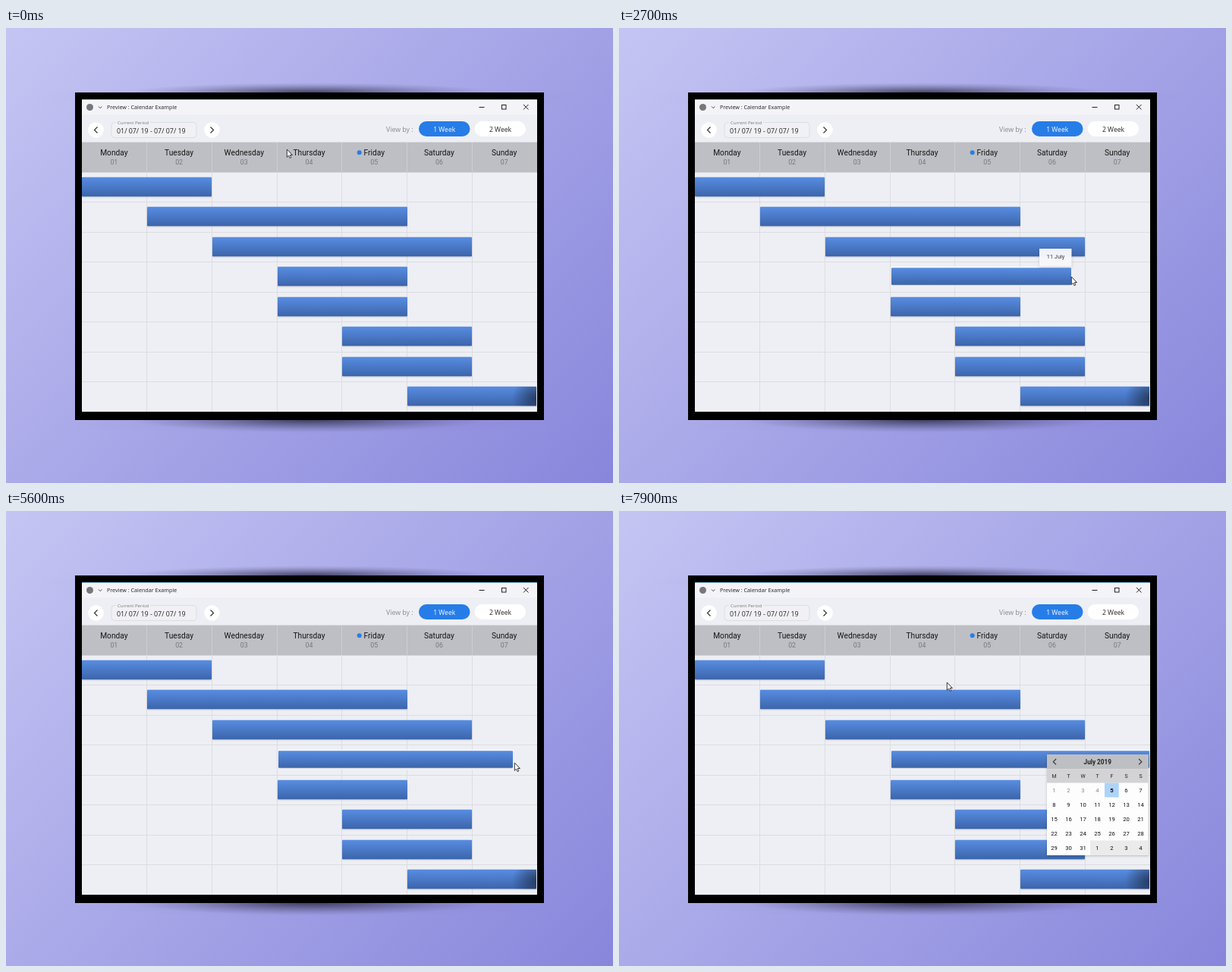
These frames come from a looping animation (800x600 px, 8000 ms). An HTML page with a canvas:

```html
<!DOCTYPE html>
<html lang="en">
<head>
<meta charset="utf-8">
<title>Calendar Example</title>
<style>
html, body { margin: 0; width: 100%; height: 100%; overflow: hidden; }
canvas { display: block; }
</style>
</head>
<body>
<canvas id="stage" width="800" height="600"></canvas>
<script>
const c = document.getElementById('stage').getContext('2d');
const LOOP = 8000, LEFT = 100, RIGHT = 699, COL = 600 / 7, ROW = 39.45;
const SANS = '"Open Sans", sans-serif', ROBOTO = 'Roboto, sans-serif';
const DAYS = ['Monday', 'Tuesday', 'Wednesday', 'Thursday', 'Friday', 'Saturday', 'Sunday'];

// first day, number of days
const TASKS = [[0, 2], [1, 4], [2, 4], [3, 2], [3, 2], [4, 2], [4, 2], [5, 2]];
const DRAGGED = 3, GRAB = 2200, DROP = 4000, DROP2 = 5600;

// time, x, y
const STOPS = [
  [0, 370, 160], [500, 432, 226], [1700, 520, 332], [GRAB, 530, 330], [2700, 596, 328],
  [3900, 611, 327], [4200, 608, 301], [4800, 615, 331], [DROP2, 670, 332], [6600, 670, 332],
  [7000, 689, 329], [7200, 690, 353], [7900, 662, 354]
];

const ramp = (t, a, b) => Math.min(1, Math.max(0, (t - a) / (b - a)));
const pulse = (t, a, b) => ramp(t, a, a + 200) * (1 - ramp(t, b, b + 320));
const edge = day => LEFT + COL * day;

function pointer(t) {
  const i = Math.max(1, STOPS.findIndex(s => s[0] > t));
  const [t1, x1, y1] = STOPS[i - 1], [t2, x2, y2] = STOPS[i], p = ramp(t, t1, t2);
  return [x1 + (x2 - x1) * p, y1 + (y2 - y1) * p];
}

// The dragged end follows the pointer, then snaps to a day edge.
function dragEnd(t) {
  const x = pointer(t)[0], snap = edge(6) - 1;
  if (t < GRAB) return edge(5);
  if (t < DROP) return Math.min(x, snap);
  if (t < DROP2) return Math.max(x - 2, snap);
  return 668 + (RIGHT - 668) * ramp(t, DROP2, 6000);
}

function rect(x, y, w, h, fill) {
  c.fillStyle = fill;
  c.fillRect(x, y, w, h);
}

function round(x, y, w, h, r, fill, stroke) {
  c.beginPath();
  c.roundRect(x, y, w, h, r);
  c.fillStyle = fill;
  c.fill();
  if (stroke) { c.strokeStyle = stroke; c.lineWidth = 1; c.stroke(); }
}

function dot(x, y, r, fill) {
  c.beginPath();
  c.arc(x, y, r, 0, 7);
  c.fillStyle = fill;
  c.fill();
}

function line(color, width, ...pts) {
  c.beginPath();
  for (let i = 0; i < pts.length; i += 2) c.lineTo(pts[i], pts[i + 1]);
  c.strokeStyle = color;
  c.lineWidth = width;
  c.stroke();
}

// dir -1 points left, 1 points right
const chevron = (x, y, s, dir) =>
  line('#333', 1.2, x - dir * s / 2, y - s, x + dir * s / 2, y, x - dir * s / 2, y + s);

function text(s, x, y, font, color, align = 'left') {
  c.font = font;
  c.fillStyle = color;
  c.textAlign = align;
  c.fillText(s, x, y);
}

function shadow(blur, color, y = 0) {
  c.shadowBlur = blur;
  c.shadowColor = color;
  c.shadowOffsetY = y;
}

function glow(x, y, rx, ry, alpha) {
  c.save();
  c.translate(x, y);
  c.scale(rx, ry);
  const g = c.createRadialGradient(0, 0, 0, 0, 0, 1);
  for (let i = 0; i <= 4; i++) g.addColorStop(i / 4, `rgba(35,35,60,${alpha * (1 - i / 4) ** 1.3})`);
  dot(0, 0, 1, g);
  c.restore();
}

function backdrop() {
  const g = c.createLinearGradient(30, -55, 770, 655);
  g.addColorStop(0, '#c6c6f4');
  g.addColorStop(1, '#8785db');
  rect(0, 0, 800, 600, g);
  glow(400, 92, 375, 18, .1);
  glow(400, 85, 235, 13, .75);
  glow(400, 520, 330, 16, .1);
  glow(400, 516, 235, 17, .8);
  rect(91, 85, 618, 432, '#000');
}

function chrome() {
  rect(100, 94, 600, 412, '#eeeff4');
  rect(100, 94, 600, 20, '#f4f4f8');
  rect(100, 94, 600, 1, '#8ccbe6');
  dot(110.5, 104.5, 4.5, '#77777b');
  line('#444', 1, 122, 103.5, 124.2, 105.7, 126.4, 103.5);
  text('Preview : Calendar Example', 133, 107.3, '7.2px ' + SANS, '#222');
  line('#222', 1, 623.5, 104.5, 630.5, 104.5);
  c.strokeRect(653.5, 101.5, 5.5, 5.5);
  line('#222', 1, 682, 101, 688.5, 107.5);
  line('#222', 1, 688.5, 101, 682, 107.5);

  [[118.5, -1], [271.5, 1]].forEach(([x, dir]) => {
    dot(x, 134.5, 10.3, '#fff');
    chevron(x, 134.5, 4, dir);
  });
  round(139, 124.5, 112, 20, 4, '#f1f1f5', '#dcdde1');
  rect(145, 123, 45, 3, '#f0f0f5');
  text('Current Period', 147, 127.3, '6px ' + SANS, '#777');
  text('01/ 07/ 19 - 07/ 07/ 19', 146, 138.5, '8.9px ' + SANS, '#222');

  text('View by :', 501, 136.7, '8.8px ' + SANS, '#888');
  round(544, 123, 67.5, 20, 10, '#267de8');
  round(617.5, 123, 67.5, 20, 10, '#fff');
  text('1 Week', 577.7, 136.5, '8.6px ' + SANS, '#fff', 'center');
  text('2 Week', 651.5, 136.5, '8.6px ' + SANS, '#222', 'center');
}

function grid() {
  for (let i = 1; i < 8; i++) rect(100, Math.round(190 + ROW * i), 600, 1, '#dcdde0');
  rect(100, 151, 600, 39, '#bebfc4');
  DAYS.forEach((day, i) => {
    const x = Math.floor(edge(i)), mid = edge(i + .5) - .5;
    if (i) {
      rect(x, 151, 1, 39, '#cdced2');
      rect(x, 190, 1, 316, '#dcdde0');
    }
    text(day, mid, 167.8, '10.2px ' + ROBOTO, '#151515', 'center');
    text('0' + (i + 1), mid, 180, '8.8px ' + ROBOTO, '#77787c', 'center');
  });
  rect(100, 150, 600, 1, '#dadbdf');
  rect(100, 190, 600, 1, '#d5d6d9');
  dot(465.7, 164.2, 3, '#2a7de6');
}

function bar(x1, x2, y, h) {
  const g = c.createLinearGradient(0, y, 0, y + h);
  g.addColorStop(0, '#588de2');
  g.addColorStop(1, '#3c65ab');
  shadow(2, 'rgba(0,0,0,.15)', 1);
  round(x1, y, x2 - x1, h, 1, g);
  shadow(0, 'transparent');
}

function bars(t) {
  TASKS.forEach(([day, days], i) => {
    const x1 = Math.ceil(edge(day)), x2 = Math.min(RIGHT, Math.round(edge(day + days)));
    const y = Math.round(197 + ROW * i) - .3;
    if (i == DRAGGED && t >= GRAB) {
      const end = dragEnd(t);
      round(x1, y, end + 1 - x1, 26.5, 1, '#f8f9fc');
      bar(x1 + 1, end, y + 1.5, 22.5);
    } else bar(x1, x2, y, 25.5);
  });
  const g = c.createRadialGradient(RIGHT, 488, 0, RIGHT, 488, 32);
  g.addColorStop(0, 'rgba(20,30,50,.65)');
  g.addColorStop(1, 'rgba(20,30,50,0)');
  rect(660, 473, 39, 25.5, g);
}

function tip(t) {
  const x = dragEnd(t);
  c.globalAlpha = Math.max(pulse(t, 2100, 3900), pulse(t, 4900, 5250));
  shadow(3, 'rgba(0,0,0,.15)', 1);
  rect(x - 42, 291, 42.5, 23.5, 'rgba(248,249,253,.96)');
  shadow(0, 'transparent');
  text('11 July', x - 20.5, 304.4, '7.3px ' + ROBOTO, '#333', 'center');
  c.globalAlpha = 1;
}

function icon(t) {
  c.globalAlpha = ramp(t, 6600, 6900) / 2;
  rect(681, 321, 16.5, 14, '#a0a6b4');
  c.globalAlpha = 1;
}

function menu(t) {
  if (t < 7200) return;
  rect(564, 321, 133.5, 134, 'rgba(60,60,60,.04)');
  c.globalAlpha = ramp(t, 7200, 7500);
  shadow(3, 'rgba(0,0,0,.2)', 1);
  rect(564, 321, 133.5, 133, '#fdfdfe');
  shadow(0, 'transparent');
  rect(564, 321, 133.5, 19.5, '#bebfc3');
  rect(564, 340.5, 133.5, 18, '#d3d3d6');
  chevron(574.2, 330.7, 3.7, -1);
  chevron(687, 330.7, 3.7, 1);
  text('July 2019', 630.7, 333.6, 'bold 8.2px ' + ROBOTO, '#222', 'center');
  rect(640, 358.5, 18.7, 19, '#add3f8');
  rect(621, 434.5, 76.5, 19.5, '#ebebec');
  for (let i = 0; i < 35; i++) {
    const x = 573.5 + i % 7 * 19, row = Math.floor(i / 7);
    if (!row) text(DAYS[i][0], x, 351.5, '7px ' + ROBOTO, '#222', 'center');
    text(i % 31 + 1, x, 370.7 + row * 19, (i == 4 ? 'bold ' : '') + '7.7px ' + ROBOTO,
      i < 4 ? '#888' : '#111', 'center');
  }
  c.globalAlpha = 1;
}

function cursor(t) {
  c.save();
  c.translate(...pointer(t));
  c.lineJoin = 'round';
  const arrow = new Path2D('M.3 0V10.3L2.6 8.2 4.1 11.6 5.8 10.8 4.3 7.5H7.4Z');
  c.fillStyle = '#fff';
  c.fill(arrow);
  c.strokeStyle = '#222';
  c.lineWidth = .9;
  c.stroke(arrow);
  c.restore();
}

function draw(now) {
  const t = Math.floor(now % LOOP / 100) * 100;
  backdrop();
  c.save();
  chrome();
  c.beginPath();
  c.rect(100, 94, 600, 412);
  c.clip();
  grid();
  [bars, tip, icon, menu, cursor].forEach(layer => layer(t));
  c.restore();
}

const start = performance.now();
function tick() {
  draw(performance.now() - start);
  requestAnimationFrame(tick);
}
tick();
</script>
</body>
</html>
```
